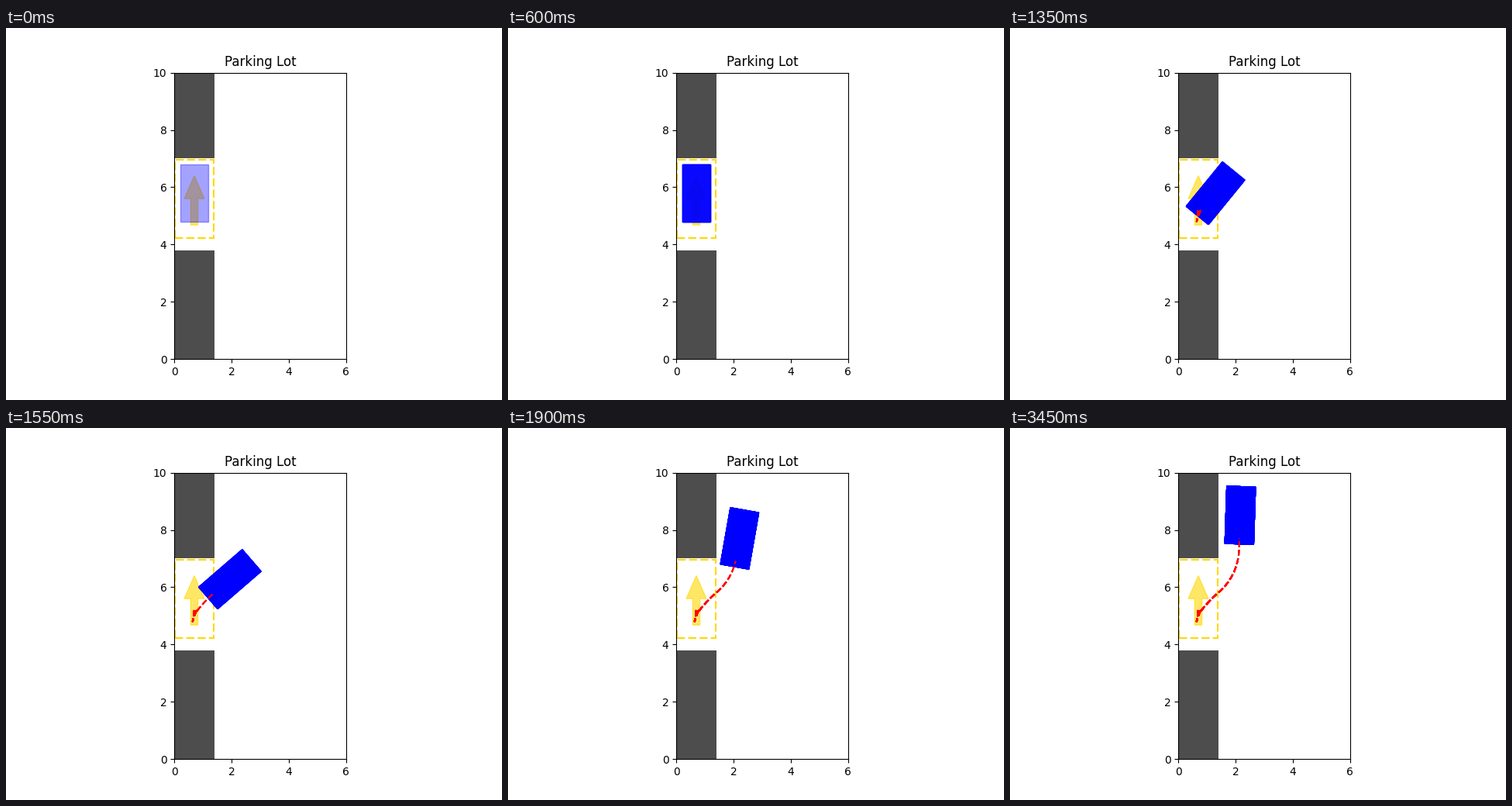
A matplotlib script that plays this animation: 640x480 px, repeating every 4100 ms.

```python
import numpy as np
import matplotlib.pyplot as plt
from matplotlib.animation import FuncAnimation
from matplotlib.patches import FancyArrow, Rectangle

FRAMES, INTERVAL = 82, 50
HOLD = 20                      # frames before the car pulls out
STEP = 0.2                     # distance driven per frame
SHARP, SOFT = 5.6, 2.5         # heading change per step, degrees
WIDTH, LENGTH, REAR = 1.0, 2.0, 0.2

GEARS = [1, -1, -1, 1, 1, -1] + [1] * 16
TURNS = [SHARP] * 7 + [SOFT] * 4 + [-SHARP] * 8 + [-SOFT, 0, 0]


def drive(x, y):
    """Poses (x, y, heading) of the rear axle, heading clockwise from up."""
    heading = 0.0
    poses = [(x, y, heading)]
    for gear, turn in zip(GEARS, TURNS):
        angle = np.radians(heading)
        x += gear * STEP * np.sin(angle)
        y += gear * STEP * np.cos(angle)
        heading += turn
        poses.append((x, y, heading))
    return np.array(poses)


poses = drive(0.7, 5.0)
last = len(poses) - 1

fig, ax = plt.subplots(figsize=(6.4, 4.8), dpi=100)
ax.set(xlim=(0, 6), ylim=(0, 10), aspect="equal", title="Parking Lot",
       xticks=range(0, 7, 2), yticks=range(0, 11, 2))
ax.set_autoscale_on(False)

for bottom, height in ((0, 3.8), (7, 3)):
    ax.add_patch(Rectangle((0, bottom), 1.4, height, fc="0.3", ec="none"))
ax.add_patch(Rectangle((0.03, 4.23), 1.34, 2.74, fill=False, ec="gold",
                       lw=1.5, ls=(0, (5, 2))))
ax.add_patch(FancyArrow(0.7, 4.68, 0, 1.72, width=0.25, head_width=0.7,
                        head_length=0.8, length_includes_head=True,
                        color="gold", alpha=0.6))

# The translucent car gains one coat per frame, the trail one per step.
coats = [ax.add_patch(Rectangle((0, 0), WIDTH, LENGTH, color="blue", alpha=0.2))
         for _ in range(FRAMES + 1)]
trails = [ax.plot(*poses[1:end + 1, :2].T, "r--", lw=1.5)[0]
          for end in range(2, last + 1)]


def update(frame):
    step = min(max(frame - HOLD, 0), last)
    x, y, heading = poses[step]
    for i, coat in enumerate(coats):
        coat.set_visible(i < frame + 2)
        coat.set_xy((x - WIDTH / 2, y - REAR))
        coat.rotation_point = (x, y)
        coat.set_angle(-heading)
    for end, trail in enumerate(trails, start=2):
        trail.set_visible(end <= step)
    return coats + trails


anim = FuncAnimation(fig, update, frames=FRAMES, interval=INTERVAL,
                     init_func=lambda: update(0), repeat=True, repeat_delay=0)
plt.show()
```
